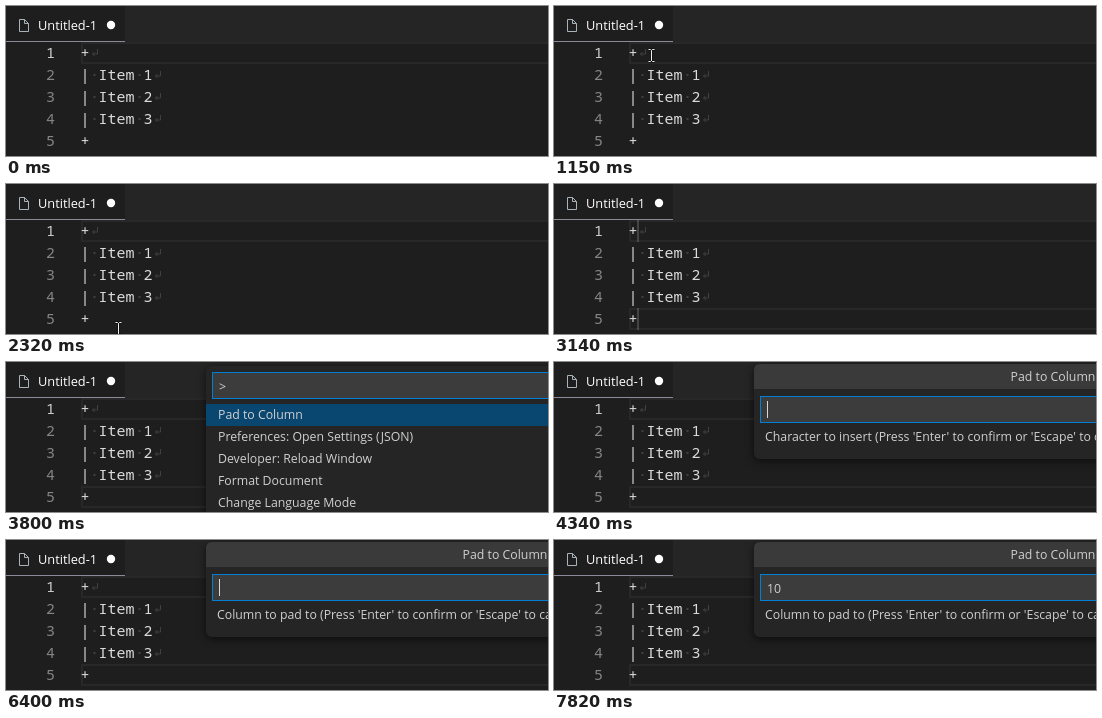
These frames come from a looping animation (542x150 px, 8000 ms). An HTML page:

```html
<!DOCTYPE html>
<html lang="en">
<head>
<meta charset="utf-8">
<title>Pad to Column</title>
<style>
  html, body { margin: 0; width: 100%; height: 100%; overflow: hidden; background: #1e1e1e; }
  svg { display: block; width: 542px; height: 150px; }
  text { white-space: pre; }
  .ui { font: 500 12.3px "Open Sans", "Noto Sans", sans-serif; fill: #d0d0d0; }
  .tab { font-size: 12.8px; fill: #fff; }
  .code { font: 500 15px "Noto Sans Mono", "DejaVu Sans Mono", monospace; fill: #dcdcdc; }
  .number { font-weight: 400; fill: #858585; text-anchor: end; }
  .active { font-weight: 500; fill: #d0d0d0; }
  .space { fill: none; stroke: #404040; }
  .border { fill: none; stroke: #282828; stroke-width: 2; }
  .caret { fill: #d8d8d8; }
  .panel { fill: #252526; filter: drop-shadow(0 2px 4px rgba(0, 0, 0, .6)); }
  .field { fill: #3c3c3c; stroke: #007fd4; }
</style>
</head>
<body>
<svg viewBox="0 0 542 150">
  <rect width="542" height="150" fill="#1e1e1e"/>
  <rect x="119" width="423" height="36" fill="#252526"/>
  <rect y="35" width="119" height="1" fill="#8a8a99"/>
  <path d="M13.5 13.5h5l4 4v8h-9zM18.5 13.5v4h4" fill="none" stroke="#a9b3ba"/>
  <text class="ui tab" x="32" y="24">Untitled-1</text>
  <circle cx="105" cy="19" r="4.2" fill="#fff"/>

  <rect class="border" x="76" y="37" width="480" height="20"/>
  <rect class="border" id="lastLine" x="76" y="125" width="480" height="20"/>
  <g id="lines"></g>
  <rect class="caret" id="firstCaret" x="83" y="36" width="2" height="22"/>
  <rect class="caret" id="lastCaret" x="83" y="124" width="2" height="22"/>

  <g id="palette">
    <rect class="panel" x="200" y="4" width="598" height="200" rx="6"/>
    <rect class="field" x="206.5" y="10.5" width="585" height="26"/>
    <rect x="200" y="42" width="598" height="22" fill="#094771"/>
    <g id="commands"></g>
  </g>

  <g id="prompt">
    <rect class="panel" x="200" y="2" width="598" height="95" rx="6"/>
    <path d="M200 27v-19q0-6 6-6h342v25z" fill="#3a3a3b"/>
    <text class="ui" x="499" y="19" text-anchor="middle">Pad to Column</text>
    <rect class="field" x="206.5" y="34.5" width="585" height="26"/>
    <text class="ui" id="message" x="211" y="79"></text>
  </g>
  <g id="input">
    <text class="ui" id="typed" x="213" y="53"></text>
    <rect class="caret" id="inputCaret" y="39" width="1" height="17"/>
  </g>

  <g id="mouse" fill="none">
    <path d="M-3-6h2l1 1 1-1h2M0-5v10M-3 6h2l1-1 1 1h2" stroke="#111" stroke-width="2.4"/>
    <path d="M-3-6h2l1 1 1-1h2M0-5v10M-3 6h2l1-1 1 1h2" stroke="#f0f0f0"/>
  </g>
</svg>
<script>
const LOOP = 8000;
const ADD_CURSOR = 2980, OPEN_PALETTE = 3300, ASK_CHARACTER = 4340, ASK_COLUMN = 6400;
const el = id => document.getElementById(id);
const clamp = v => Math.min(1, Math.max(0, v));

const code = ["+", "| Item 1", "| Item 2", "| Item 3", "+"];
el("lines").innerHTML = code.map((line, i) => {
  const y = 46 + 22 * i, end = 75 + 9 * line.length;
  const dots = [...line].map((c, n) => c === " "
    ? `<rect x="${78.5 + 9 * n}" y="${y}" width="2" height="2" fill="#404040"/>` : "").join("");
  const newline = i < code.length - 1
    ? `<path class="space" d="M${end + 7.5} ${y - 3}v5h-5m2-2l-2 2l2 2"/>` : "";
  return `<text class="code number ${i ? "" : "active"}" x="49" y="${y + 6}">${i + 1}</text>
    <text class="code" x="74.5" y="${y + 6}">${line}</text>${dots}${newline}`;
}).join("");

const commands = ["Pad to Column", "Preferences: Open Settings (JSON)", "Developer: Reload Window",
  "Format Document", "Change Language Mode"];
el("commands").innerHTML = commands.map((name, i) =>
  `<text class="ui" x="212" y="${57 + 22 * i}">${name}</text>`).join("");

// Text of the input box from each moment on
const typing = [
  { at: OPEN_PALETTE, text: ">" },
  { at: ASK_CHARACTER, text: "" },
  { at: 5430, text: "-" },
  { at: ASK_COLUMN, text: "" },
  { at: 7200, text: "1" },
  { at: 7490, text: "10" },
];

const mouseStops = [
  { at: 750, x: 76, y: 137 },
  { at: 1150, x: 97, y: 49 },
  { at: 1310, x: 88, y: 47 },
  { at: 1520, x: 88, y: 47 },
  { at: 1840, x: 108, y: 140 },
  { at: 2360, x: 112, y: 144 },
];

function mouseAt(t) {
  const i = mouseStops.findLastIndex(stop => stop.at <= t);
  const a = mouseStops[Math.max(i, 0)], b = mouseStops[i + 1] || a;
  const p = a === b ? 0 : (t - a.at) / (b.at - a.at);
  const mix = key => Math.round(a[key] + (b[key] - a[key]) * p) + .5;
  return [mix("x"), mix("y")];
}

// Full from `shown`, then fading out after `hold`
const caretFade = (t, shown, hold, fade) =>
  t < shown ? 0 : clamp(1 - (t - shown - hold) / fade);

function show(id, visible) {
  el(id).style.display = visible ? "" : "none";
}

function drawInput(t) {
  const step = typing.findLast(s => s.at <= t);
  show("input", step);
  if (!step) return;
  el("input").setAttribute("transform", `translate(0 ${t < ASK_CHARACTER ? -24 : 0})`);
  el("typed").textContent = step.text;
  el("inputCaret").setAttribute("x", Math.ceil(213 + el("typed").getComputedTextLength()));
  show("inputCaret", t - step.at < (t < ASK_COLUMN ? 500 : 300));
}

function draw(t) {
  show("mouse", t >= 750 && t < 2610);
  el("mouse").setAttribute("transform", `translate(${mouseAt(t)})`);

  const added = caretFade(t, ADD_CURSOR, 0, 200);
  el("firstCaret").style.opacity = Math.max(caretFade(t, 1520, 440, 240), added);
  el("lastCaret").style.opacity = added;
  show("lastLine", t >= ADD_CURSOR);
  show("palette", t >= OPEN_PALETTE && t < ASK_CHARACTER);
  show("prompt", t >= ASK_CHARACTER);
  el("message").textContent = (t < ASK_COLUMN ? "Character to insert" : "Column to pad to")
    + " (Press 'Enter' to confirm or 'Escape' to cancel)";
  drawInput(t);
}

const start = performance.now();
function tick() {
  draw((performance.now() - start) % LOOP);
  requestAnimationFrame(tick);
}
tick();
</script>
</body>
</html>
```
